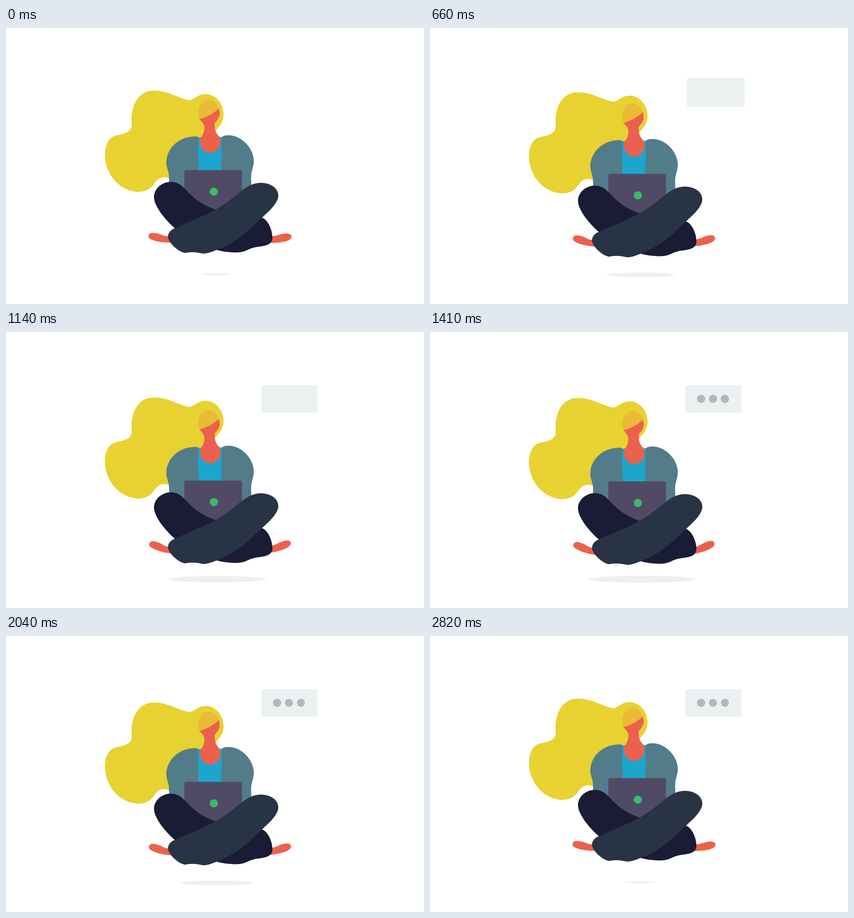
Animation of 921 by 608 pixels, one loop 2.88 s. Source, as an HTML page:

```html
<!DOCTYPE html>
<html lang="en">
<head>
<meta charset="utf-8">
<title>Floating with a laptop</title>
<style>
  html, body { margin: 0; width: 100%; height: 100%; overflow: hidden; background: #fff; }
  svg { display: block; width: 100%; height: 100%; }
  .hair { fill: #e8d232; }
  .fringe { fill: #eabb36; }
  .skin { fill: #ec614d; }
  .shirt { fill: #1ca6cd; }
  .jacket { fill: #527c89; }
  .laptop { fill: #514a67; }
  .light { fill: #37be64; }
  .back-leg { fill: #1a1b35; }
  .front-leg { fill: #283345; }
  .pale { fill: #ebf1f1; }
  .dots { fill: #adb9bd; }
</style>
</head>
<body>
<svg viewBox="0 0 921 608">
  <ellipse id="shadow" class="pale"/>
  <rect id="bubble" class="pale" x="562" y="117" width="124" height="61" rx="4"/>
  <g class="dots">
    <circle cx="597.2" cy="147.2"/>
    <circle cx="623.4" cy="147.2"/>
    <circle cx="649.7" cy="147.2"/>
  </g>

  <path id="hair" class="hair" d="M404 159C416 158 420 146 440 145.500C462 146 479.500 166 479.500 191C479 207 470 218 460 227L440 300L370 335L358 331C350 328 340 328 332 336C325 342 321 360 292 361C246 359 218 318 218 279C218 260 225 241 242 237C258 233 277 231 277 213C277 203 275 195 279 181C284 158 298 138 327 138C357 138 385 157 404 159Z"/>

  <path id="leftFoot" class="skin" d="M368 458C352 459 348 458 342 455C335 452 326 451 320 451.500C313 453 312 462 318 465C328 470 345 473.500 368 472.500Z"/>
  <path id="rightFoot" class="skin" d="M577 459C594 460 603 454 613 453C621 452 630 453 629 461C627 470 606 474 577 473.500Z"/>

  <g id="body">
    <path class="shirt" d="M421 241L478 240V320H421Z"/>
    <path class="jacket" d="M424 242C425 247 422 258 422.500 272C424 285 425 297 424 314L394 360H360C358 338 361 326 357 315C354 305 352 298 354 287C359 262 381 240 415 239C420 238 423 240 424 242Z"/>
    <path class="jacket" d="M476 240C480 236 488 236 495 236.500C521 239 546 266 546 293C546 306 540 315 540 330L541 355L519 365V314H475C473 301 475 292 475.500 280C476 268 473 258 476 240Z"/>
    <path class="skin" d="M426 200C431 207 437 210 437 219C437 231 433 237 428 243C427 246 427.500 249 427.500 252A22.500 23 0 0 0 472.500 252C473 248 472 243 470 239C463 233 459 224 460 209C466 203 471 196 471 188C471 184 470 180 469 177Z"/>
    <path class="fringe" d="M426 201C418 186 426 159 446 158C459 158 466 167 469 177C457 189 442 196 426 201Z"/>
    <rect class="laptop" x="393" y="313" width="127" height="110" rx="4"/>
    <circle class="light" cx="458" cy="360.500" r="9"/>
    <path class="back-leg" d="M326 372C327 352 345 339 363 339C378 339 386 346 393 353C406 367 424 387 462 400L500 420L565 418C578 424 587 445 587 462C587 478 570 480 556 482C530 485 532 495 503 494.500C488 494 475 492 464 489L372 441C350 422 326 392 326 372Z"/>
    <path class="front-leg" d="M372 441C395 430 435 415 462 400C490 384 505 369 520 358C530 350 545 341 561 341C582 341 600 352 600 369C600 386 578 405 564 418C540 441 510 472 464 489C452 494 442 497 434 497C424 495 414 492 395 495.500C380 494 357 472 357 460C357 450 364 444 372 441Z"/>
  </g>
</svg>
<script>
const LOOP = 2880, STEP = 30, LAST = 2820;
const $ = id => document.getElementById(id);
const dots = [...document.querySelectorAll('.dots circle')];
const dotRadii = [9, 8.7, 8.7];
const set = (el, attrs) => Object.entries(attrs).forEach(([k, v]) => el.setAttribute(k, v));

// Linear rise to 1 at peak, linear fall to 0 at end.
const swing = (t, peak, end) =>
  t < peak ? t / peak : Math.max(0, (end - t) / (end - peak));

// Cosine easing through [time, value] keys.
function keyed(t, keys) {
  if (t <= keys[0][0]) return keys[0][1];
  for (let i = 1; i < keys.length; i++) {
    const [t0, v0] = keys[i - 1], [t1, v1] = keys[i];
    if (t < t1) return v0 + (v1 - v0) * (1 - Math.cos(Math.PI * (t - t0) / (t1 - t0))) / 2;
  }
  return keys[keys.length - 1][1];
}

const moveY = (el, y) => set(el, { transform: `translate(0 ${y})` });
const tilt = (el, y, angle, pivot) =>
  set(el, { transform: `translate(0 ${y}) rotate(${angle} ${pivot} 466)` });

function draw(t) {
  moveY($('body'), 16.8 * swing(t, 1350, 2700));
  moveY($('hair'), 10 * swing(t, 1920, 2700));

  const foot = swing(t, 1380, 2850);
  tilt($('leftFoot'), 17.5 * foot, 10 * foot, 357);
  tilt($('rightFoot'), 14.5 * foot, -12 * foot, 587);

  const spread = 90.5 * swing(t, 1350, 2865), rx = 31 + spread;
  set($('shadow'), { cx: 462 + 0.05 * spread, cy: 542.7 + 0.023 * spread, rx, ry: rx * 0.0655 });

  // The bubble grows out of the laptop's upper edge.
  const size = keyed(t, [[0, 0], [650, 1.035], [870, 0.99], [1050, 1]]);
  set($('bubble'), { transform: `translate(462 313) scale(${size}) translate(-462 -313)` });

  dots.forEach((dot, i) => {
    const pop = keyed(t - 1100 - 50 * i, [[0, 0], [210, 1.06], [330, 1]]);
    set(dot, { r: dotRadii[i] * pop });
  });
}

function tick() {
  const t = performance.now() % LOOP;
  draw(Math.min(LAST, Math.floor(t / STEP) * STEP));
  requestAnimationFrame(tick);
}
tick();
</script>
</body>
</html>
```
